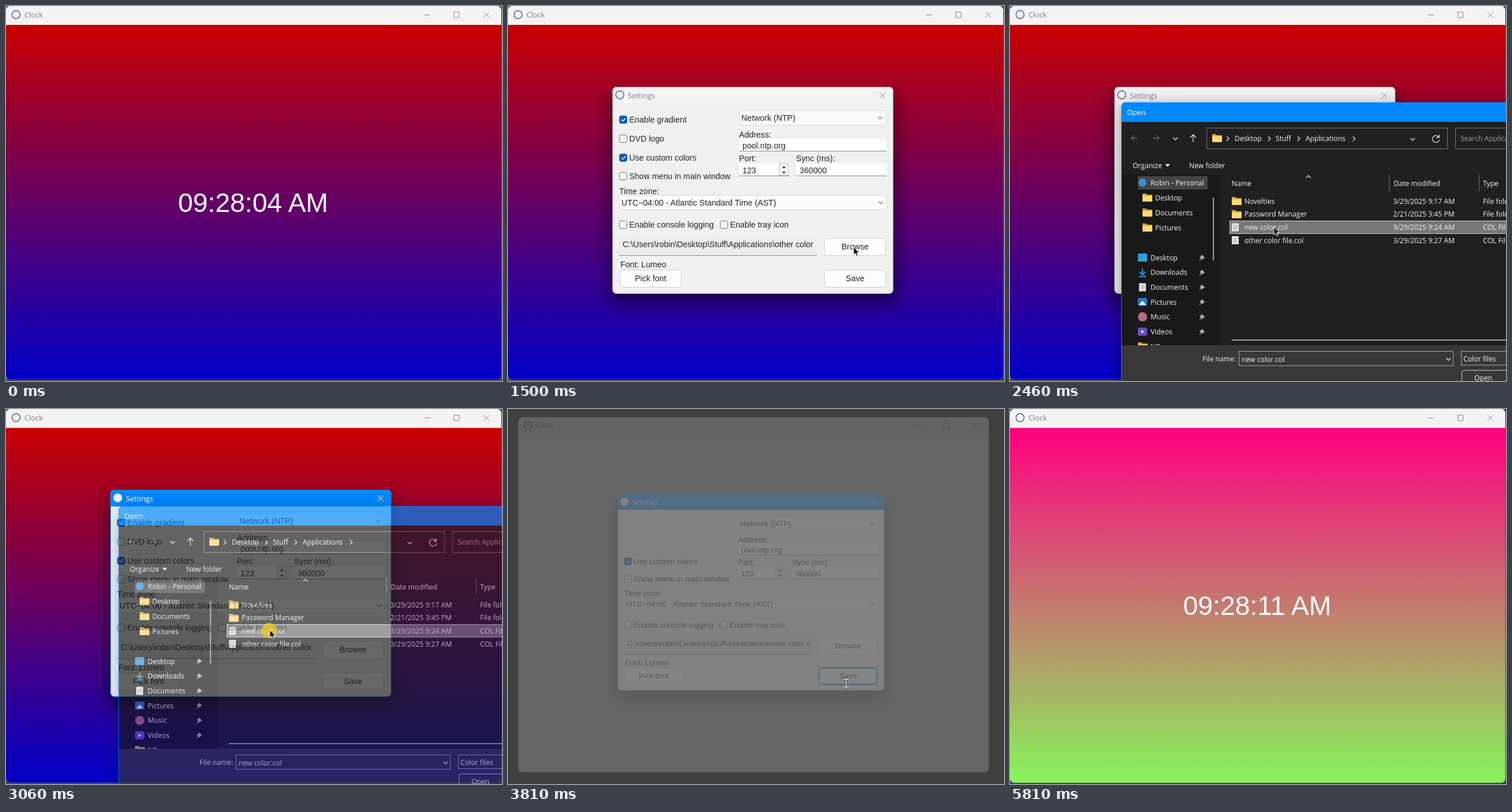
These frames come from a looping animation (861 px wide and 650 px high, 5.88 s). An HTML page:

```html
<!DOCTYPE html>
<html lang="en">
<head>
<meta charset="utf-8">
<title>Clock</title>
<style>
html, body { margin: 0; width: 100%; height: 100%; overflow: hidden; background: #404040; }
svg { display: block; width: 861px; height: 650px; }
text { white-space: pre; }
.ui { font: 12.8px "Open Sans", "Noto Sans", sans-serif; }
.form { font: 14.2px "Liberation Sans", sans-serif; fill: #262626; }
.dark { font: 12.2px "Open Sans", "Noto Sans", sans-serif; fill: #f4f4f4; }
.time { font: 46.4px "Liberation Sans", sans-serif; fill: #fff; }
.mid { text-anchor: middle; }
.ln { fill: none; stroke: #e4e4e4; stroke-width: 1.3; }
.bar { fill: #f3f3f3; }
.cap { fill: #857c92; }
.btn { fill: none; stroke: #8d7f96; }
.edge { fill: none; stroke: #777; stroke-opacity: .6; }
.badge { fill: #f2f2f8; stroke: #5a5a78; stroke-width: 1.5; }
.on .bar { fill: #0088ff; }
.on .cap { fill: #fff; }
.on .btn { stroke: #fff; }
.on .edge { stroke: #0088ff; stroke-opacity: 1; }
.on .badge { stroke: #cfd6dc; }
</style>
</head>
<body>
<svg id="stage" viewBox="0 0 861 650"></svg>
<script>
const LOOP = 5880;
const $ = id => document.getElementById(id);

// Drawing helpers
const text = (x, y, s, cls) => `<text x="${x}" y="${y}" class="${cls}">${s}</text>`;
const rect = (x, y, w, h, fill, more = '') =>
  `<rect x="${x}" y="${y}" width="${w}" height="${h}" fill="${fill}" ${more}/>`;
const line = (d, cls = 'ln', more = '') => `<path d="${d}" class="${cls}" ${more}/>`;
const dot = (x, y, r, more) => `<circle cx="${x}" cy="${y}" r="${r}" ${more}/>`;
const group = (id, body, more = '') => `<g id="${id}" ${more}>${body}</g>`;
const cross = (x, y) => line(`M${x - 5} ${y - 5}l10 10m0-10l-10 10`, 'btn');
const down = (x, y, more = '') => line(`M${x - 4} ${y - 2}l4 4l4-4`, 'ln', more);
const shadow = (x, y, w, h, alpha) =>
  rect(x, y, w, h, '#000', `opacity="${alpha}" filter="url(#blur)"`);
const ramp = (id, a, b) => `<linearGradient id="${id}" x1="0" y1="0" x2="0" y2="1">
  <stop stop-color="${a}"/><stop offset="1" stop-color="${b}"/></linearGradient>`;

// Settings form parts
const label = (x, y, s) => text(x, y, s, 'form');
const grey = 'style="stroke:#777;stroke-width:1.1"';
const check = (x, y, s, on) =>
  rect(x + .5, y - 6.5, 13, 13, on ? '#0a5fc0' : '#f6f6f6', `rx="3" stroke="${on ? '#0a5fc0' : '#707070'}"`) +
  (on ? line(`M${x + 4} ${y}l2.5 2.5l4.5-5`, 'ln', 'style="stroke:#fff"') : '') +
  label(x + 17.5, y + 5, s);
const combo = (x, y, w, s) =>
  rect(x + .5, y + .5, w, 25, '#fbfbfb', 'stroke="#d8d8d8" rx="2"') +
  label(x + 4, y + 18, s) + down(x + w - 10, y + 13, grey);
const field = (x, y, w, s) =>
  rect(x, y, w, 22, '#fff', 'rx="2"') + rect(x, y + 21, w, 1, '#8a8a8a') + label(x + 6, y + 17, s);
const button = (id, x, y, s) =>
  rect(x + .5, y + .5, 106, 30, '#fdfdfd', `id="${id}" rx="4" stroke="#d0d0d0"`) +
  text(x + 53.5, y + 20, s, 'form mid');

const mainWin = group('main',
  `<g clip-path="url(#mainClip)">` +
  rect(0, 0, 861, 650, '#fff') + rect(0, 32.5, 861, 616, 'url(#old)', 'id="fill"') +
  text(429, 357, '', 'time mid').replace('<text', '<text id="time"') +
  rect(0, 0, 861, 32.5, '', '').replace('fill=""', 'class="bar"') + '</g>' +
  dot(17.5, 15, 7, 'class="badge"') + text(32, 20, 'Clock', 'ui cap') +
  line('M726 15.5h10M777.5 10.5h9v9.5h-9zM829 10.5l10 10m0-10l-10 10', 'btn') +
  rect(-.5, -.5, 860.5, 648.5, 'none', 'rx="8" class="edge"'));

const settings = group('settings',
  shadow(177, 154, 496, 362, .5) +
  `<g clip-path="url(#setClip)">` + rect(181, 140, 488, 359, '#f0f0f0') +
  '<rect x="181" y="140" width="488" height="29" class="bar"/></g>' +
  dot(194, 154, 7, 'class="badge"') + text(208, 159.5, 'Settings', 'ui cap') + cross(650, 155) +
  group('topChecks', check(193, 197, 'Enable gradient', 1) + check(193, 230, 'DVD logo')) +
  check(193, 263, 'Use custom colors', 1) + check(193, 295, 'Show menu in main window') +
  combo(401, 181, 255, 'Network (NTP)') +
  label(401, 228, 'Address:') + field(401, 230, 256, 'pool.ntp.org') +
  label(401, 269, 'Port:') + field(401, 273, 88, '123') +
  rect(470.5, 273.5, 17, 20, '#f2f2f2', 'stroke="#c8c8c8"') +
  '<path d="M476 281l3-4l3 4zM476 287l3 4l3-4z" fill="#444"/>' +
  label(500, 269, 'Sync (ms):') + field(500, 273, 157, '360000') +
  label(193, 326, 'Time zone:') + combo(193, 328, 464, 'UTC−04:00 - Atlantic Standard Time (AST)') +
  check(193, 379, 'Enable console logging') + check(368, 379, 'Enable tray icon') +
  rect(193, 401, 343, 32, '#ececec', 'rx="2"') + rect(193, 432, 343, 1, '#8a8a8a') +
  `<g clip-path="url(#pathClip)"><text id="path" x="199" y="418" class="form"></text></g>` +
  label(195, 453, 'Font: Lumeo') + button('pick', 194, 457, 'Pick font') +
  button('browse', 549, 402, 'Browse') + button('save', 549, 457, 'Save') +
  rect(181.5, 140.5, 487, 358, 'none', 'rx="8" class="edge"'));

// Open dialog
const put = (x, y, s) => text(x, y + 4.5, s, 'dark');
const folder = (x, y) => `<path d="M${x} ${y - 7}h6l2 2h9v12h-17z" fill="#d9a533"/>` +
  rect(x, y - 3, 17, 10, '#ffd978', 'rx="1"');
const page = (x, y) => rect(x, y - 7, 12, 14, '#e6e6e6', 'rx="1"') +
  line(`M${x + 2} ${y - 3}h8m-8 3h8m-8 3h8`, 'ln', 'style="stroke:#8a9aa8;stroke-width:1"');
const pin = y => `<path d="M335 ${y - 5}l6 6l-3 0l-2 3l-5-5l3-2z" fill="#aaa"/>` +
  line(`M335 ${y + 1}l-4 4`, 'ln', 'style="stroke:#aaa"');
const tile = (y, color) => rect(224, y - 7, 16, 14, color, 'rx="2"');

const quick = [
  ['Desktop', y => tile(y, '#2f9ce0')],
  ['Downloads', y => line(`M232 ${y - 7}v11m-5-5l5 5l5-5m-11 8h12`, 'ln', 'style="stroke:#35a0d8;stroke-width:2"')],
  ['Documents', y => page(226, y)],
  ['Pictures', y => tile(y, '#2878d0') + `<path d="M226 ${y + 5}l6-7l6 7z" fill="#fff"/>`],
  ['Music', y => dot(232, y, 8, 'fill="#b56a86"')],
  ['Videos', y => tile(y, '#6a4fc0') + `<path d="M230 ${y - 3}l5 3l-5 3z" fill="#fff"/>`]
];
const files = [
  ['Novelties', '3/29/2025 9:17 AM', 'File folder', folder],
  ['Password Manager', '2/21/2025 3:45 PM', 'File folder', folder],
  ['new color.col', '3/29/2025 9:24 AM', 'COL File', page],
  ['other color file.col', '3/29/2025 9:27 AM', 'COL File', page]
];
const crumbs = [[392, 'Desktop'], [463, 'Stuff'], [515, 'Applications']];
const next = x => line(`M${x - 2} 227l4 4l-4 4`);
const box = 'stroke="#777"';

const loaded = group('loaded',
  rect(195, 202, 680, 388, '#202020') + rect(195, 293, 172, 297, '#191919') +
  text(205, 190, 'Open', 'ui cap') +
  line('M224 230h-11m5-5l-5 5l5 5M250 230h11m-5-5l5 5l-5 5', 'ln', 'opacity=".35"') + down(289, 231) +
  line('M320 237v-13m-5 5l5-5l5 5') +
  rect(343.5, 212.5, 418, 36, 'none', box) + folder(353, 230) + next(380) +
  crumbs.map(([x, s]) => put(x, 230.5, s)).join('') + [452, 503, 599].map(next).join('') +
  down(701, 232) + line('M746 228a6 6 0 1 0 1 5m0-9v5h-5') +
  rect(775.5, 212.5, 200, 36, 'none', box) + `<g opacity=".6">${put(784, 230, 'Search Applications')}</g>` +
  put(215, 277, 'Organize') + '<path d="M271 275h9l-4.500 5z" fill="#ddd"/>' + put(313, 277, 'New folder') +
  put(387, 308, 'Name') + put(668, 308, 'Date modified') + put(823, 308, 'Type') +
  line('M516 299l4-4l4 4') + line('M660.500 293v28M816.500 293v28', 'ln', 'style="stroke:#666"') +
  rect(224, 296, 121, 23, '#454545') + dot(232, 307, 7, 'fill="#2f8fe0"') + put(246, 307, 'Robin - Personal') +
  ['Desktop', 'Documents', 'Pictures'].map((s, i) => folder(232, 333 + 26 * i) + put(254, 333 + 26 * i, s)).join('') +
  quick.map(([s, icon], i) => {
    const y = 437 + 25.7 * i;
    return icon(y) + put(246, y, s) + pin(y);
  }).join('') +
  folder(224, 591) + put(246, 591, 'NR') +
  rect(354, 333, 2, 109, '#a0a0a0') +
  group('pickRow', rect(383.5, 373.5, 500, 22, '#777', 'stroke="#ccc"')) +
  files.map(([name, date, kind, icon], i) => {
    const y = 339 + 22.7 * i;
    return icon(387, y) + put(409, y, name) + put(667, y, date) + put(823, y, kind);
  }).join('') +
  rect(387, 579, 500, 2, '#a0a0a0') +
  rect(195, 589, 680, 70, '#383838') + put(336, 612, 'File name:') +
  rect(399.5, 599.5, 372, 25, '#383838', 'stroke="#aaa"') + group('fileName', put(404, 613, 'new color.col')) +
  down(763, 613) + rect(785.5, 599.5, 120, 24, 'none', 'stroke="#aaa"') + put(789, 612, 'Color files') +
  rect(786.5, 632.5, 120, 26, 'none', 'rx="4" stroke="#ccc"') + put(808, 645, 'Open'));

const blank = group('blank',
  dot(213, 184, 7, 'class="badge"') + text(228, 190, 'Open', 'ui cap') +
  group('parts',
    rect(199, 294, 165, 295, '#191919') + rect(354, 312, 2, 144, '#a0a0a0') +
    rect(387, 571, 500, 18, '#191919') + rect(387, 579, 500, 2, '#a0a0a0') +
    rect(195, 589, 680, 70, '#373737') + rect(336, 603, 58, 16, '#fff') +
    rect(400, 599, 372, 26, '#fff') + rect(785, 599, 90, 24, '#fff') + rect(785, 630, 90, 30, '#fff')));

const openWin = group('open',
  shadow(197, 176, 760, 600, .45) +
  `<g clip-path="url(#openClip)">` + rect(195, 168, 700, 500, '#fff') +
  '<rect x="195" y="168" width="700" height="34" class="bar"/>' + blank + loaded + '</g>' +
  '<path d="M195.500 650V176a8 8 0 0 1 8-8" class="edge"/>', 'class="on"');

const pointer = group('pointer',
  dot(-1, 1, 13, 'id="halo" fill="#eecb20"') +
  '<path id="arrow" d="M0 0V13.500L3.200 10.600L5.400 15.600L7.600 14.600L5.400 9.800H9.600Z"/>' +
  group('beam', ['#222', '#fff'].map((c, i) =>
    `<path d="M-4-7h3l1 1l1-1h3M0-6V6M-4 7h3l1-1l1 1h3" fill="none" stroke="${c}" stroke-width="${3 - 1.6 * i}"/>`).join('')));

const clip = (id, shape) => `<clipPath id="${id}">${shape}</clipPath>`;
$('stage').innerHTML = '<defs>' +
  ramp('old', '#c80000', '#0000c8') + ramp('new', '#ff0080', '#88f45c') +
  '<filter id="blur" x="-20%" y="-20%" width="140%" height="140%"><feGaussianBlur stdDeviation="15"/></filter>' +
  clip('mainClip', rect(0, 0, 860, 648, '#000', 'rx="8"')) +
  clip('setClip', rect(181, 140, 488, 359, '#000', 'rx="8"')) +
  clip('openClip', rect(195, 168, 720, 520, '#000', 'rx="8"')) +
  clip('pathClip', rect(195, 400, 338, 30, '#000')) +
  '</defs>' + mainWin + settings + openWin + pointer;

// Pointer route: time, x, y
const route = [
  [130, 861, 600], [400, 640, 470], [560, 683, 513], [760, 683, 513], [1250, 600, 418],
  [1640, 600, 418], [1910, 431, 387], [2200, 458, 383], [3150, 458, 383], [3600, 587, 475],
  [3880, 587, 475], [4050, 205, 652], [4120, 218, 637], [4270, 322, 620], [4430, 505, 498],
  [4560, 559, 420], [4640, 563, 392], [4800, 590, 330], [5200, 800, 137], [5380, 815, 156],
  [5600, 810, 580]
];
const clicks = [[400, 480], [1290, 1390], [2240, 2340], [2780, 3110], [3630, 3710]];

const part = (t, a, b) => Math.min(1, Math.max(0, (t - a) / (b - a)));
const within = (t, a, b) => t >= a && t < b;
const show = (id, on) => $(id).setAttribute('visibility', on ? 'inherit' : 'hidden');
const zoom = (s, x, y) => `translate(${x * (1 - s)} ${y * (1 - s)}) scale(${s})`;
const pose = (id, transform, opacity) => {
  $(id).setAttribute('transform', transform);
  $(id).setAttribute('opacity', opacity);
};

function drawPointer(t) {
  const i = Math.max(1, route.findIndex(k => k[0] > t));
  const [a, ax, ay] = route[i - 1], [b, bx, by] = route[i];
  const p = part(t, a, b);
  const beam = within(t, 3740, 3900);
  $('pointer').setAttribute('transform', `translate(${ax + (bx - ax) * p} ${ay + (by - ay) * p})`);
  show('pointer', within(t, 130, 5600));
  show('beam', beam);
  show('arrow', !beam);
  const light = t < 1000;
  $('arrow').setAttribute('fill', light ? '#fff' : '#000');
  $('arrow').setAttribute('stroke', light ? '#000' : '#fff');
  $('halo').setAttribute('opacity', clicks.some(c => within(t, ...c)) ? .78 : 0);
}

function draw(t) {
  const fresh = t >= 3880;
  const closing = within(t, 3700, 3880);

  // Main window, closing and reopening
  const out = part(t, 3700, 3838), back = part(t, 3890, 4010);
  const shrink = `translate(${18 * out / .8} ${14.2 * out / .8}) scale(${1 - .0625 * out})`;
  if (fresh) pose('main', zoom(1 - .1 * (1 - back) ** 2, 430, 324), back);
  else pose('main', shrink, 1 - out);
  $('main').setAttribute('class', within(t, 130, 560) || within(t, 3880, 5810) ? 'on' : '');
  $('fill').setAttribute('fill', fresh ? 'url(#new)' : 'url(#old)');
  show('fill', !closing);
  show('time', !closing);
  const second = 4 + Math.floor((t + 750) / 880);
  $('time').textContent = `09:28:${String(second).padStart(2, '0')} AM`;

  // Settings dialog
  const grow = 1 - .1 * (1 - part(t, 550, 790)) ** 2;
  pose('settings', t < 1000 ? zoom(grow, 424, 319) : shrink, t < 1000 ? part(t, 550, 650) : 1 - out);
  show('settings', within(t, 550, 3880));
  show('topChecks', within(t, 550, 3700));
  $('settings').setAttribute('class', within(t, 1360, 2950) ? '' : 'on');
  $('path').textContent = String.raw`C:\Users\robin\Desktop\Stuff\Applications` +
    (t < 3200 ? '\\other color file.col' : '\\new color.col');
  $('save').setAttribute('stroke', t >= 3640 ? '#0067c0' : '#d0d0d0');
  $('save').setAttribute('stroke-width', t >= 3640 ? 2 : 1);

  // Open dialog
  const leave = part(t, 2980, 3230);
  const slide = Math.min(1, leave / .32);
  pose('open', `translate(${2 * slide - 2} ${slide - 1})`, part(t, 1640, 1780) * (1 - leave));
  show('open', within(t, 1640, 3230));
  show('blank', within(t, 1640, 2000));
  show('parts', within(t, 1840, 2000));
  show('loaded', within(t, 2000, 3230));
  show('pickRow', within(t, 2250, 3230));
  show('fileName', within(t, 2250, 3230));

  drawPointer(t);
}

function tick() {
  draw(performance.now() % LOOP);
  requestAnimationFrame(tick);
}
tick();
</script>
</body>
</html>
```
